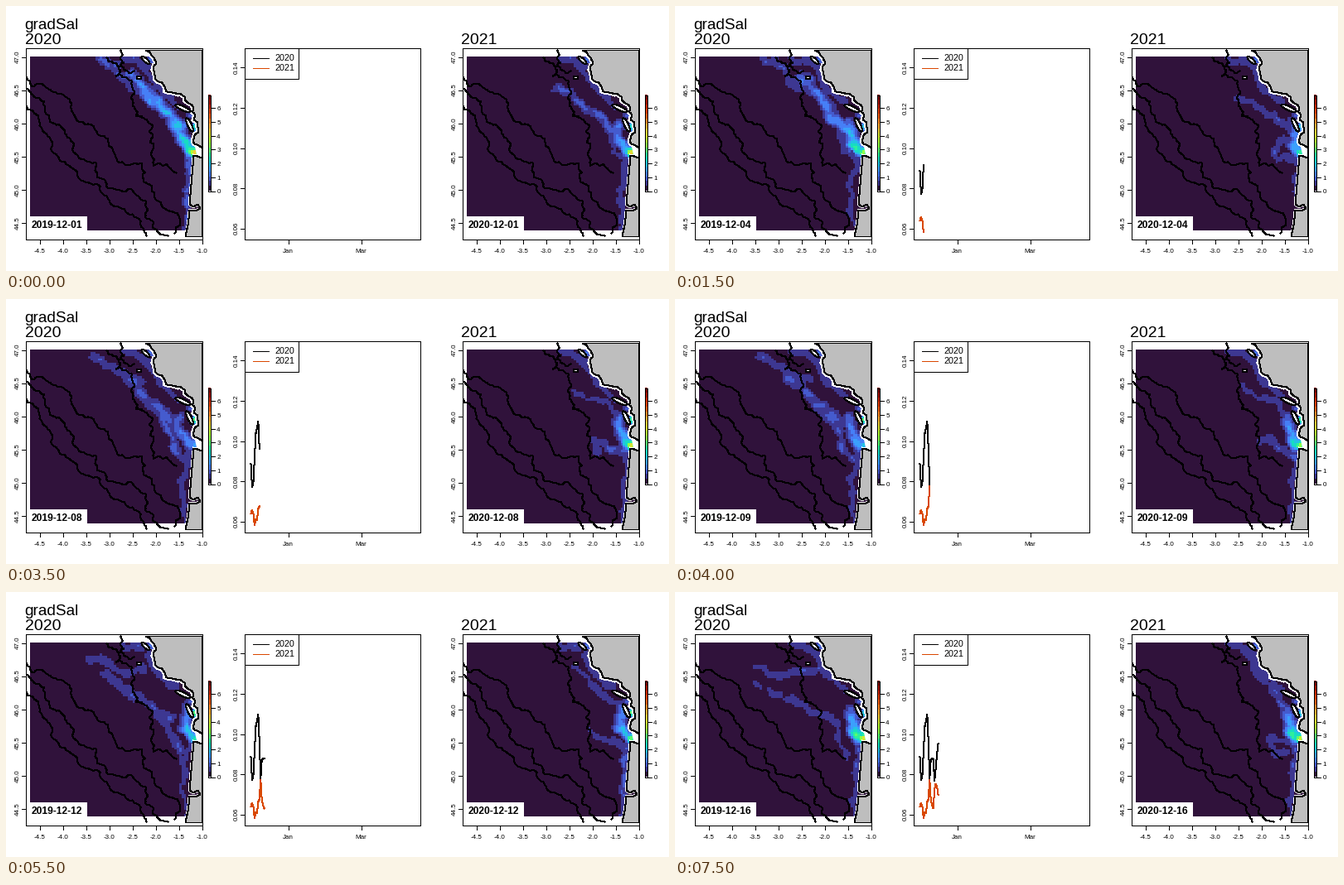
A matplotlib script that plays this animation: 800x320 px, repeating every 8000 ms.

```python
import numpy as np
import matplotlib.pyplot as plt
from matplotlib.animation import FuncAnimation
from matplotlib.patches import Ellipse, Polygon, Rectangle

plt.rcParams["font.family"] = "Liberation Sans"
PX = 0.72  # points per pixel at 100 dpi
DAYS = 16
LEVELS = 20
STEP = 0.35
ORANGE = "#d94801"
COLS, ROWS = 74, 78
GX, GY = np.meshgrid(29 + (np.arange(COLS) + .5) * 207 / COLS,
                     61 + (np.arange(ROWS) + .5) * 210 / ROWS)

fig = plt.figure(figsize=(8, 3.2), dpi=100, facecolor="white")
ax = fig.add_axes([0, 0, 1, 1])
ax.axis("off")


def line(xs, ys, color="black", z=5, width=1):
    return ax.plot(xs, ys, color=color, lw=width * PX, zorder=z,
                   antialiased=False, solid_joinstyle="miter")[0]


def label(x, y, s, size=8, **kw):
    kw.setdefault("va", "baseline")
    return ax.text(x, y, s, fontsize=size * PX, zorder=9, **kw)


def box(x0, y0, x1, y1, fill="none", edge="black", z=6):
    ax.add_patch(Rectangle((x0, y0), x1 - x0, y1 - y0, fc=fill, ec=edge,
                           lw=PX, zorder=z, antialiased=False))


def x_ticks(spots, names, y=281):
    for x, s in zip(spots, names):
        line([x, x], [y, y + 5])
        label(x, 298, s, ha="center")


def y_ticks(spots, names, x):
    for y, s in zip(spots, names):
        line([x - 5, x], [y, y])
        label(x - 9.5, y, s, rotation=90, ha="center", va="center")


def pairs(*v):
    return np.array(v, float).reshape(-1, 2)


def roughen(pts, seed, depth, scale):
    """Midpoint displacement, so a few points give a ragged line."""
    rng = np.random.default_rng(seed)
    for _ in range(depth):
        step = np.diff(pts, axis=0)
        side = np.c_[-step[:, 1], step[:, 0]]
        mid = pts[:-1] + step / 2 + side * rng.uniform(-scale, scale, (len(step), 1))
        out = np.empty((len(pts) + len(mid), 2))
        out[::2], out[1::2] = pts, mid
        pts = out
    return pts


# Map geometry, in the pixels of the left panel
coast = pairs(168, 53, 176, 60, 180, 70, 177, 76, 182, 90, 191, 97, 192, 102,
              207, 106, 215, 109, 226, 122, 224, 127, 228, 131, 226, 137,
              231, 140, 232, 152, 227, 156, 227, 166, 236, 171)
south = pairs(236, 183, 226, 180, 221, 239, 226, 242, 231, 239, 234, 244,
              228, 247, 221, 246, 216, 278)
corners = pairs(236, 278, 236, 53)
shore = [roughen(coast, 3, 2, .2), roughen(south, 4, 1, .04)]

depths = []


def depth_line(scale, *v):
    depths.append(roughen(pairs(*v), 20 + len(depths), 4, scale))


depth_line(.32, 121, 62, 138, 80, 132, 84, 152, 98, 153, 116, 156, 132,
           173, 150, 173, 164, 205, 201)
depth_line(.32, 138, 53, 142, 68, 136, 73, 154, 78)
depth_line(.24, 23, 84, 31, 97, 60, 104, 78, 123, 117, 156, 130, 177,
           164, 190, 179, 228, 206, 249, 203, 274)
depth_line(.24, 23, 98, 45, 114, 52, 140, 73, 157, 81, 176, 108, 189,
           122, 219, 168, 235, 168, 255, 195, 277)
depth_line(.24, 23, 119, 39, 138, 62, 181, 86, 200, 118, 228, 157, 255,
           169, 277)


def over_days(days, vals):
    """Value, or array of values, moving straight between the given days."""
    vals = np.array(vals, float)

    def at(day):
        i = np.clip(np.searchsorted(days, day, "right") - 1, 0, len(days) - 2)
        u = (day - days[i]) / (days[i + 1] - days[i])
        return vals[i] * (1 - u) + vals[i + 1] * u
    return at


KEYS = (1, 4, 6, 8, 10, 12, 16)


def keyed(*vals):
    return over_days(KEYS, vals)


def ridge(x, y, pts, a0, a1, w):
    """Band around a polyline whose strength runs from a0 to a1."""
    pts = np.reshape(pts, (-1, 2))
    n = len(pts) - 1
    best = np.zeros_like(x)
    for i, (p, q) in enumerate(zip(pts[:-1], pts[1:])):
        d = q - p
        t = np.clip(((x - p[0]) * d[0] + (y - p[1]) * d[1]) / (d @ d), 0, 1)
        r2 = (x - p[0] - t * d[0]) ** 2 + (y - p[1] - t * d[1]) ** 2
        amp = a0 + (a1 - a0) * (i + t) / n
        best = np.maximum(best, amp * np.exp(-r2 / w ** 2))
    return best


def spot(cx, cy, amp, w):
    return amp * np.exp(-((GX - cx) ** 2 + (GY - cy) ** 2) / w ** 2)


class Sea:
    """Fronts are poses of (start strength, end strength, path) over the days."""

    def __init__(self, bulge, plume, mouth, bay, drift, strip):
        self.bulge, self.plume, self.mouth = bulge, plume, mouth
        self.bay, self.drift, self.strip = bay, drift, strip
        self.fronts = []

    def front(self, width, days, *poses):
        self.fronts.append((width, over_days(days, poses)))

    def field(self, day):
        x = GX + 2.2 * np.sin(GY / 6 + day) + 1.2 * np.sin(GY / 2.7 - GX / 5)
        y = GY + 2.2 * np.sin(GX / 7 - .8 * day) + 1.2 * np.sin(GX / 2.9 + GY / 6)
        b, p, s, d = (f(day) for f in (self.bulge, self.plume, self.strip, self.drift))
        layers = [
            ridge(x, y, [143, 64, 166, 68, 180, 94, 204, 118], .6, .5, 7),
            ridge(x, y, [222, 183, 219 + d, 210, 217 + d, 240, 217, 271], s, .7 * s, 6),
            ridge(x, y, [217 - b, 143, 216 - b, 157, 219 - b / 2, 168, 226, 177],
                  .7 + .15 * p, p, 7.5),
        ]
        for width, pose in self.fronts:
            a0, a1, *path = pose(day)
            layers.append(ridge(x, y, path, a0, a1, width))
        v = np.max(layers, axis=0)
        v *= 1 + .22 * np.sin(GX / 5 + GY / 8 + day) * np.sin(GY / 5 - GX / 9)
        spots = [spot(226, 177, self.mouth(day), 6),
                 spot(229, 146, self.bay(day), 6),
                 spot(174, 65, 1.1, 5), spot(222, 132, .8, 6),
                 spot(231, 122, .6, 6)]
        v = np.max([v] + spots, axis=0)
        return np.clip(np.floor(v / STEP), 0, LEVELS - 1)


sea_a = Sea(bulge=keyed(5, 6, 11, 9, 2, 0, 4),
            plume=keyed(2.8, 3, 1.8, 1.2, 2, 2.2, 3),
            mouth=keyed(4.6, 3.6, 2.3, 1.6, 2.4, 2.6, 4.3),
            bay=keyed(2.9, 2.4, 3.4, 3.6, 3.6, 3.8, 2.6),
            drift=keyed(1, -7, -10, -6, -4, -5, 0),
            strip=keyed(.9, .6, .6, .6, .6, .6, .7))
sea_a.front(8, (1, 6, 16),
            (1.1, 2.2, 153, 86, 178, 113, 206, 145, 222, 174),
            (.8, .9, 150, 84, 170, 106, 187, 134, 205, 146),
            (.42, .5, 97, 114, 130, 126, 165, 142, 192, 158))
sea_a.front(7, (1, 10, 16),
            (.8, .6, 113, 64, 132, 72, 144, 92, 155, 104),
            (.6, .5, 103, 72, 125, 80, 140, 95, 165, 96),
            (.42, .7, 97, 92, 115, 98, 140, 100, 172, 92))
sea_a.front(6, (1, 6, 16),
            (.3, .3, 196, 140, 203, 158, 212, 172, 220, 180),
            (.8, .9, 190, 142, 196, 158, 203, 178, 215, 187),
            (.45, .5, 170, 142, 194, 160, 200, 185, 206, 198))

sea_b = Sea(bulge=keyed(6, -3, 0, 3, 3, 3, 4),
            plume=keyed(1.9, 2, 2, 2.2, 2.4, 2.2, 2.8),
            mouth=keyed(4.4, 2.8, 3.2, 4.2, 2.9, 3.2, 4),
            bay=keyed(3, 2.2, 3.2, 3.4, 3.4, 3.6, 2.6),
            drift=keyed(-3, 2, 2, 1, 0, 1, 0),
            strip=keyed(.7, .45, .5, .6, .7, .9, .7))
sea_b.front(6, (1, 6, 16),
            (.7, .9, 133, 98, 160, 111, 188, 134, 204, 152),
            (.45, .45, 160, 120, 176, 126, 198, 127, 214, 145),
            (.5, .7, 160, 72, 176, 98, 192, 120, 212, 140))
sea_b.front(6, (1, 4, 8, 10, 16),
            (.5, .4, 220, 165, 205, 160, 203, 175, 216, 182),
            (.7, .6, 222, 160, 200, 165, 198, 185, 220, 185),
            (.8, .5, 225, 182, 203, 181, 180, 172, 190, 189),
            (.7, .5, 220, 195, 205, 180, 190, 166, 163, 156),
            (.5, .5, 217, 180, 190, 178, 195, 200, 207, 190))


def map_panel(dx, title):
    box(23 + dx, 50, 236 + dx, 281)
    clip = Rectangle((23 + dx, 50), 213, 231, transform=ax.transData)
    shift = np.array([dx, 0])
    img = ax.imshow(np.zeros((ROWS, COLS)), cmap="turbo", vmin=0, vmax=LEVELS - 1,
                    extent=(28.5 + dx, 236 + dx, 270.5, 60.5),
                    interpolation="nearest", aspect="auto", zorder=1)
    for part, w in zip(shore, (5, 2.5)):
        line(*(part + shift).T, color="white", z=2, width=w).set_clip_path(clip)
    river = pairs(227, 167, 236, 171, 236, 183, 230, 181) + shift
    ax.add_patch(Polygon(river, fc="white", ec="none", zorder=2))
    style = dict(ec="black", lw=PX, zorder=3, antialiased=False)
    land = Polygon(np.vstack(shore + [corners]) + shift, fc="#bebebe", **style)
    isles = [Ellipse((x + dx, y), w, h, angle=a, fc="white", **style)
             for x, y, w, h, a in ((168, 65, 13, 4, 42), (160, 86, 6, 4, 0),
                                   (213, 123, 20, 5, 25), (221, 143, 18, 5, 65))]
    for patch in [land] + isles:
        ax.add_patch(patch)
        patch.set_clip_path(clip)
    for pts in depths:
        line(*(pts + shift).T, z=4).set_clip_path(clip)

    x_ticks(40 + dx + 28 * np.arange(8), [f"{-4.5 + .5 * i:.1f}" for i in range(8)])
    y_ticks(61 + 40.1 * np.arange(6), [f"{47 - .5 * i:.1f}" for i in range(6)], 23 + dx)
    label(22 + dx, 46, title, 19.5)

    ax.imshow(np.arange(LEVELS)[::-1, None], cmap="turbo",
              extent=(243 + dx, 246 + dx, 223, 107),
              interpolation="nearest", aspect="auto", zorder=3)
    box(243 + dx, 107, 246 + dx, 223)
    for i in range(7):
        y = 223 - 16.7 * i
        line([246 + dx, 251 + dx], [y, y])
        label(256 + dx, y + 3, str(i), ha="center")

    box(28 + dx, 253, 96 + dx, 269, "white", "white", 7)
    return img, label(30 + dx, 267, "", 12, weight="bold")


img_a, date_a = map_panel(0, "2020")
img_b, date_b = map_panel(527, "2021")
label(22, 27, "gradSal", 19)

# Time series, one value per day
series_a = [.0886, .0770, .0792, .0914, .1037, .1062, .1099, .0959,
            .0778, .0873, .0877, .0877, .0766, .0828, .0901, .0951]
series_b = [.0638, .0658, .0638, .0580, .0613, .0605, .0662, .0675,
            .0774, .0671, .0646, .0629, .0724, .0753, .0741, .0696]


def to_y(v):
    return 268 - (np.asarray(v) - .06) * 2425


day_x = 295 + 1.47 * np.arange(DAYS)
box(287, 50, 499, 281)
x_ticks([340, 428], ["Jan", "Mar"])
marks = .06 + .02 * np.arange(5)
y_ticks(to_y(marks), [f"{m:.2f}" for m in marks], 287)
box(287, 50, 352, 87)
for y, name, col in ((62, "2020", "black"), (74, "2021", ORANGE)):
    line([297, 316], [y, y], col)
    label(324, y + 4, name, 10.7)
curve_a = line([], [])
curve_b = line([], [], ORANGE)


def draw(i):
    day = i + 1
    img_a.set_data(sea_a.field(day))
    img_b.set_data(sea_b.field(day))
    date_a.set_text(f"2019-12-{day:02d}")
    date_b.set_text(f"2020-12-{day:02d}")
    n = day if day > 1 else 0
    curve_a.set_data(day_x[:n], to_y(series_a[:n]))
    curve_b.set_data(day_x[:n], to_y(series_b[:n]))
    return img_a, img_b, date_a, date_b, curve_a, curve_b


# Whole pixels fall on whole numbers
ax.set_xlim(-0.5, 799.5)
ax.set_ylim(319.5, -0.5)
anim = FuncAnimation(fig, draw, frames=DAYS, interval=500, repeat=True, repeat_delay=0)
plt.show()
```
